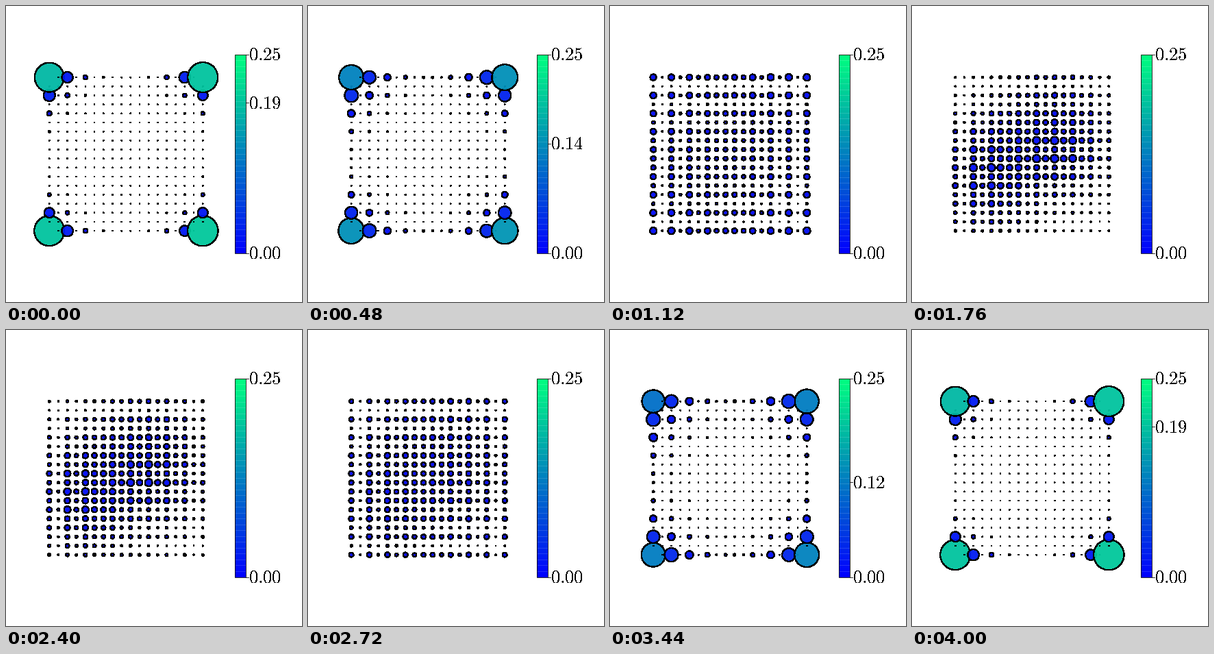
Animation of 432x432 px, one loop 4.08 s. Source, as a matplotlib script:

```python
import numpy as np
import matplotlib.pyplot as plt
from matplotlib.animation import FuncAnimation

plt.rcParams["mathtext.fontset"] = "cm"
plt.rcParams["text.antialiased"] = False

SIZE, FRAMES, STEP = 432, 51, 80
CELLS = 9
N = 2 * CELLS
P_MAX = 0.25
SCALE = 50.3          # marker radius = SCALE * sqrt(weight)
R_MIN = 0.25
BAR_X, BAR_W, BAR_TOP, BAR_BOTTOM = 334, 15.5, 71, 361
ALPHA = 0.95
CMAP = plt.get_cmap("winter")


def chain_mode(ratio):
    """Weights of the lowest chain state, counted in cells from its edge."""
    hop = ratio * np.eye(CELLS) + np.eye(CELLS, k=1)
    return np.linalg.svd(hop)[2][-1] ** 2


def corner_modes(ratio):
    """One state per corner, each on its own sublattice and slightly detuned."""
    p = np.zeros((N, N))
    for sx in (0, 1):
        for sy in (0, 1):
            u = chain_mode(ratio + 0.015 - 0.03 * sx * sy)
            v = chain_mode(ratio + 0.04 - 0.065 * max(sx, sy))
            u = u[::-1] if sx else u
            v = v[::-1] if sy else v
            p[sx::2, sy::2] = np.outer(u, v) / 4
    return p


def bump(even, odd):
    """Bell curve along a chain; (centre, width, height) per sublattice."""
    i = np.arange(N)
    curves = [h * np.exp(-((i - c) / w) ** 2) for c, w, h in (even, odd)]
    return np.where(i % 2, curves[1], curves[0])


left = np.outer(bump((3, 5, 1), (5.5, 5, 0.8)),
                bump((10.5, 7.5, 1), (10.5, 7.5, 0.72)))
right = np.outer(bump((11, 7, 0.8), (11, 7, 1)),
                 bump((5, 8, 0.75), (8, 6, 1)))
BULK = (6 / SCALE) ** 2 * (left ** 2 + right ** 2)


def weights(k):
    ratio = 0.9 - 0.54 * np.cos(2 * np.pi * k / (FRAMES - 1))
    t = np.clip((min(k, FRAMES - 1 - k) - 11) / 14, 0, 1)
    mix = t * t * (3 - 2 * t)
    return (1 - mix) * corner_modes(ratio) + mix * BULK


def bar_y(value):
    return BAR_BOTTOM - (BAR_BOTTOM - BAR_TOP) * value / P_MAX


def tick(value):
    y, x = bar_y(value), BAR_X + BAR_W
    line, = ax.plot([x, x + 4], [y, y], color="black", lw=0.8)
    text = ax.text(x + 5, y + 0.7, f"${value:.2f}$", size=26.6,
                   ha="left", va="center")
    return line, text


fig = plt.figure(figsize=(SIZE / 72, SIZE / 72), dpi=72, facecolor="white")
ax = fig.add_axes([0, 0, 1, 1])
ax.axis("off")

# Colour bar with its faint seams.
rows = BAR_BOTTOM - BAR_TOP
shades = CMAP(np.linspace(1, 0, rows))[:, None, :3]
seams = (np.arange(rows) * 256 / rows) % 1 < 0.117
shades[seams] = 0.86 * shades[seams] + 0.14
ax.imshow(shades, extent=(BAR_X, BAR_X + BAR_W, BAR_BOTTOM, BAR_TOP),
          interpolation="nearest", aspect="auto")
ax.add_patch(plt.Rectangle((BAR_X, BAR_TOP), BAR_W, rows,
                           fill=False, ec="black", lw=0.8))
tick(0)
tick(P_MAX)
mark, label = tick(0.19)

ax.set_xlim(0, SIZE)
ax.set_ylim(SIZE, 0)

# Rows are stacked from the bottom up, each from left to right.
pitch = 224 / (N - 1)
gx, gy = np.meshgrid(63.2 + pitch * np.arange(N),
                     104.1 + pitch * np.arange(N)[::-1])
dots = ax.scatter(gx.ravel(), gy.ravel(), s=1, edgecolors="black",
                  linewidths=1.3, antialiased=False, zorder=3)


def draw(k):
    p = weights(k)
    flat = p.T[::-1].ravel()
    radius = np.maximum(SCALE * np.sqrt(flat), R_MIN)
    dots.set_sizes((2 * radius) ** 2)
    dots.set_facecolor(CMAP(flat / P_MAX, alpha=ALPHA))

    corner = p[[0, 0, -1, -1], [0, -1, 0, -1]].mean()
    y = bar_y(corner)
    mark.set_ydata([y, y])
    label.set_y(y + 0.7)
    label.set_text(f"${corner:.2f}$")
    for item in (mark, label):
        item.set_visible(corner >= 0.01)
    return dots, mark, label


anim = FuncAnimation(fig, draw, frames=FRAMES, interval=STEP,
                     repeat=True, repeat_delay=0)
plt.show()
```
